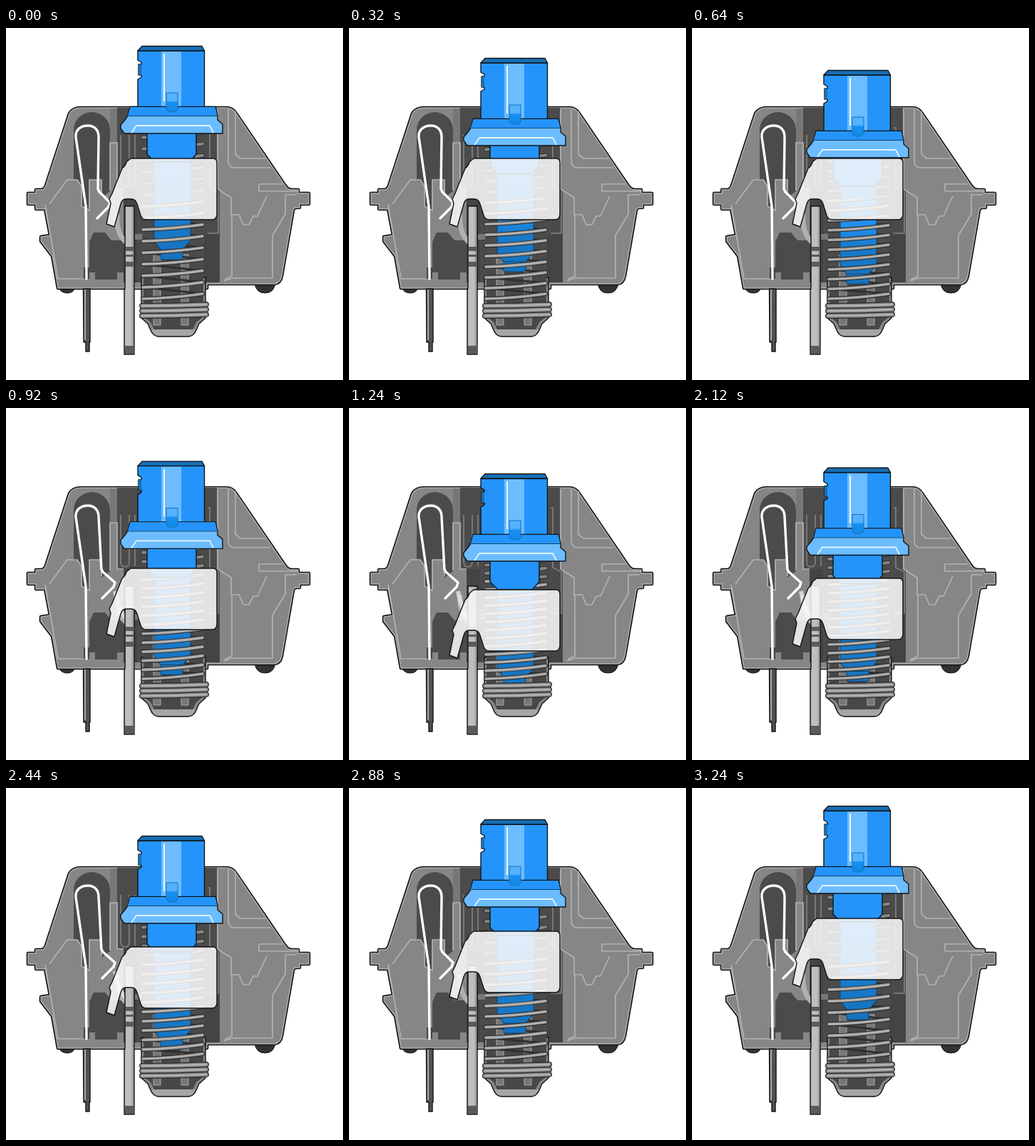
An HTML page that plays this animation: 473 by 494 pixels, repeating every 3280 ms.

```html
<!DOCTYPE html>
<html lang="en">
<head>
<meta charset="utf-8">
<title>Key switch</title>
<style>
html, body { margin: 0; width: 100%; height: 100%; overflow: hidden; background: #fff; }
svg { display: block; width: 473px; height: 494px; }
.line { fill: none; stroke: #b2b2b2; stroke-width: 1.7; stroke-linejoin: round; }
.ink { stroke: #101418; stroke-width: 1.4; stroke-linejoin: round; }
.dark { fill: #4b4b4b; }
.gray { fill: #868686; }
.wire { fill: none; stroke-linecap: round; stroke-linejoin: round; }
</style>
</head>
<body>
<svg viewBox="0 0 473 494">
  <defs>
    <path id="shell" d="M89 120Q94 112 105 112H309Q318 112 323 120L391 220Q395 227 401 227H410V232H425V247H412V252H408Q404 252 403 256L387 348Q385 358 377 359H282V365H73L65 320L49 299V293L62 291L55 254H42V247H31V232H42V227H49Q54 227 56 221Z"/>
    <linearGradient id="tab" x2="0" y2="1"><stop stop-color="#55b2ff"/><stop offset=".4" stop-color="#55b2ff"/><stop offset=".5" stop-color="#168ff0"/><stop offset="1" stop-color="#1288e4"/></linearGradient>
    <linearGradient id="metal"><stop stop-color="#9c9c9c"/><stop offset=".15" stop-color="#bebebe"/><stop offset=".7" stop-color="#bebebe"/><stop offset=".8" stop-color="#a2a2a2"/></linearGradient>
    <linearGradient id="leg" x2="0" y2="1"><stop stop-color="#2494fb"/><stop offset=".45" stop-color="#2090f0"/><stop offset=".65" stop-color="#177acb"/><stop offset="1" stop-color="#1573bf"/></linearGradient>
    <clipPath id="lower"><path d="M180 240H290V384H180Z"/></clipPath>
  </defs>

  <!-- housing -->
  <path d="M349 358H378Q376 372 363.500 372T349 358ZM74 364H97Q95 372 86 372T74 364Z" fill="#333" stroke="#111"/>
  <use href="#shell" stroke="#101010" stroke-width="4.600" stroke-linejoin="round"/>
  <use href="#shell" fill="#868686" stroke="#aeaeae" stroke-width="1.400"/>
  <path class="dark" d="M95 143A25.500 25 0 0 1 146 143V229L134 238V213H117V256L106 250V222L100 213H95Z"/>
  <path class="dark" d="M156 112H296V224L300 229V357H165V226H156Z"/>
  <path class="dark" d="M117 300L123 287H139L148 298H166V353H117Z"/>
  <path class="gray" d="M117 343H125V353H117ZM156 343H166V357H156Z"/>
  <path d="M146 113H156V161H146Z" fill="#777"/>
  <path class="line" d="M61 247L86 213H100L106 222V250L117 256V213H134V236M146 228V161H156V226H165M55 248L73 352H112"/>
  <path d="M161 150V216Q161 223 167 223T173 216V150M181 150V222M283 140H286V224L298 230V288H283" class="line" stroke-width="1" opacity=".5"/>
  <path class="line" d="M312 114V188Q313 196 321 196H371M322 117V177L329 183H364M297 114V226L316 238V262H327L333 276H341L347 264H353L366 236M411 229H355V219H388M408 234H392V261L374 291V351H317L306 355M317 262V348L307 353"/>
  <path d="M165 226H184V357H165ZM278 290H300V357H278Z" fill="#444"/>

  <!-- socket below the spring -->
  <path class="ink gray" d="M190 350H280V407L271 415L267 424Q264 432 256 433H214Q206 432 203 424L199 415L190 407Z"/>
  <path d="M193 340H277V405L267 413L262 423H208L203 413L193 405Z" fill="#484848"/>
  <path d="M204 423H266Q263 432 256 432H214Q207 432 204 423Z" fill="#a5a5a5"/>
  <path d="M207 318H217V417H207ZM246 318H256V417H246Z" fill="#777" stroke="#a9a9a9"/>

  <path d="M156 262Q154 289 170 302" fill="none" stroke="#b0b0b0" stroke-width="7"/>
  <path id="glint" d="M153 257Q158 286 170 296" fill="none" stroke="#e8e8e8" stroke-width="6"/>

  <path id="backCoils" class="wire" stroke="#303030" stroke-width="3"/>
  <g class="coils">
    <path class="wire" stroke="#292929" stroke-width="6"/>
    <path class="wire" stroke="#858585" stroke-width="4.200"/>
  </g>
  <path id="legPart" d="M200 178H265V181L259 190V298L248 311V325H217V311L208 298V190L200 181Z" fill="url(#leg)" stroke="#10436d"/>
  <path id="legMark" fill="none" stroke="#10436d" d="M208 299L217 311H248L258 299"/>
  <g class="coils" clip-path="url(#lower)">
    <path class="wire" stroke="#292929" stroke-width="6"/>
    <path class="wire" stroke="#969696" stroke-width="4.200"/>
    <path class="wire" stroke="#c4c4c4" stroke-width="1.200"/>
  </g>
  <g id="tight">
    <path class="wire" stroke="#292929" stroke-width="8"/>
    <path class="wire" stroke="#8f8f8f" stroke-width="5.600"/>
    <path class="wire" stroke="#c0c0c0" stroke-width="1.600"/>
  </g>
  <path id="neck" class="ink" d="M198 146H267V177L257 188H209L198 177Z" fill="#2494fb"/>

  <!-- terminals and leaf -->
  <path class="ink" d="M108.500 366H118V441H117V454H112V441H109Z" fill="#554f53"/>
  <path d="M110 367H112V438H110Z" fill="#aaa"/>
  <path d="M109 336H117V352H109Z" fill="#444"/>
  <path class="ink" d="M167 250H180V458H166V366H167Z" fill="url(#metal)"/>
  <path d="M168 307H180V313H168ZM168 318H180V321H168ZM168 328H180V335H168ZM167 446H180V457H167Z" fill="#5b5b5b"/>
  <path d="M181 289H191V297H181Z" fill="#777"/>
  <path id="leaf" class="wire" stroke="#fff" stroke-width="3.400"/>

  <path id="slider" class="ink" d="M175 183H290Q296 183 296 189V262Q295 269 289 269H197Q191 269 189 263L184 247Q182 240 176 240H168Q163 240 161 247L152 279L141 275L147 246L145 240L149 232L163 197Q168 193 169 188Z" fill="#fbfafa" fill-opacity=".87"/>

  <!-- plunger -->
  <g id="stem">
    <path class="ink" d="M185 32H278.500V111H185V72L190 69V66H186V51H190V48L185 45Z" fill="#2494fb"/>
    <path d="M186 51H190V66H186Z" fill="#1a6fb5"/>
    <path d="M218 33H246V110H218Z" fill="#6cbcff"/>
    <path d="M222 36V103" stroke="#eef8ff" stroke-width="2"/>
    <path class="ink" d="M191 25.500H275L278.500 32H185Z" fill="#176fb5"/>
    <path class="ink" d="M174 110.500H294L297 123V129L304 135V148H166L161 141V136L167 129L171 123Z" fill="#6cbcff"/>
    <path d="M174.500 111H293.500L296 123H171Z" fill="#2494fb"/>
    <path d="M170 123.500H297" stroke="#10436d"/>
    <path d="M176 147L183 137H286L291 147" fill="none" stroke="#e2f3ff" stroke-width="1.800"/>
    <path d="M225 91H241V114Q240 118 233 118T225 114Z" fill="url(#tab)" stroke="#1470bd"/>
  </g>
</svg>
<script>
const STEP = 40, STEPS = 82, FALL = 72, TURNS = 14;
const el = id => document.getElementById(id);
const leaf = el('leaf'), slider = el('slider'), glint = el('glint'), backCoils = el('backCoils');
const stemParts = ['stem', 'neck', 'legPart', 'legMark'].map(el);
const frontCoils = [...document.querySelectorAll('.coils path')];

const move = (node, y) => node.setAttribute('transform', `translate(0 ${y.toFixed(2)})`);

// Linear interpolation through [x, y] points
function ramp(points, x) {
  if (x <= points[0][0]) return points[0][1];
  for (let i = 1; i < points.length; i++) {
    const [x0, y0] = points[i - 1], [x1, y1] = points[i];
    if (x <= x1) return y0 + (y1 - y0) * (x - x0) / (x1 - x0);
  }
  return points[points.length - 1][1];
}

const stemAt = n => ramp([[0, 0], [16, 34], [31, 67], [40, 86], [41, 84.5], [45, 75], [61, 42], [72, 19], [81, 0]], n);
// Pushed by the flange, snaps down, then is carried back up
const sliderAt = n => ramp([[16, 0], [22, 12], [24, FALL], [45, FALL], [61, 40], [72, 18], [81, 0]], n);
const leafAt = s => ramp([[0, 0], [9, -3.2], [18, 0], [22, 2], [32, 7]], s);

function drawSpring(top) {
  const gap = (380 - top) / TURNS;
  let front = '', back = '';
  for (let i = 0; i <= TURNS; i++) {
    const y = top + i * gap;
    front += `M192 ${y}Q235 ${y - 1} 276 ${y - 7}`;
    if (i) back += `M276 ${y - 7}L192 ${y - gap}`;
  }
  frontCoils.forEach(p => p.setAttribute('d', front));
  backCoils.setAttribute('d', back);
}

function draw(n) {
  const drop = stemAt(n), s = sliderAt(n), k = leafAt(s);
  stemParts.forEach(p => move(p, drop));
  move(slider, s);
  drawSpring(153.5 + drop);
  leaf.setAttribute('d', `M113 352L112 250L98 153C97 142 106 137 115 137C124 137 130 143 130 153L${129 + k * .7} 226L${131 + k * .7} 230L${146 + k} 245L${144 + k} 251L${128 + k} 267`);
  glint.setAttribute('opacity', Math.max(0, k / 9).toFixed(2));
}

const tight = [389, 396, 403].map(y => `M191 ${y + 1}Q236 ${y + 1} 281 ${y - 1}`).join('');
for (const p of el('tight').children) p.setAttribute('d', tight);

const start = performance.now();
function tick() {
  draw(Math.floor((performance.now() - start) / STEP) % STEPS);
  requestAnimationFrame(tick);
}
tick();
</script>
</body>
</html>
```
